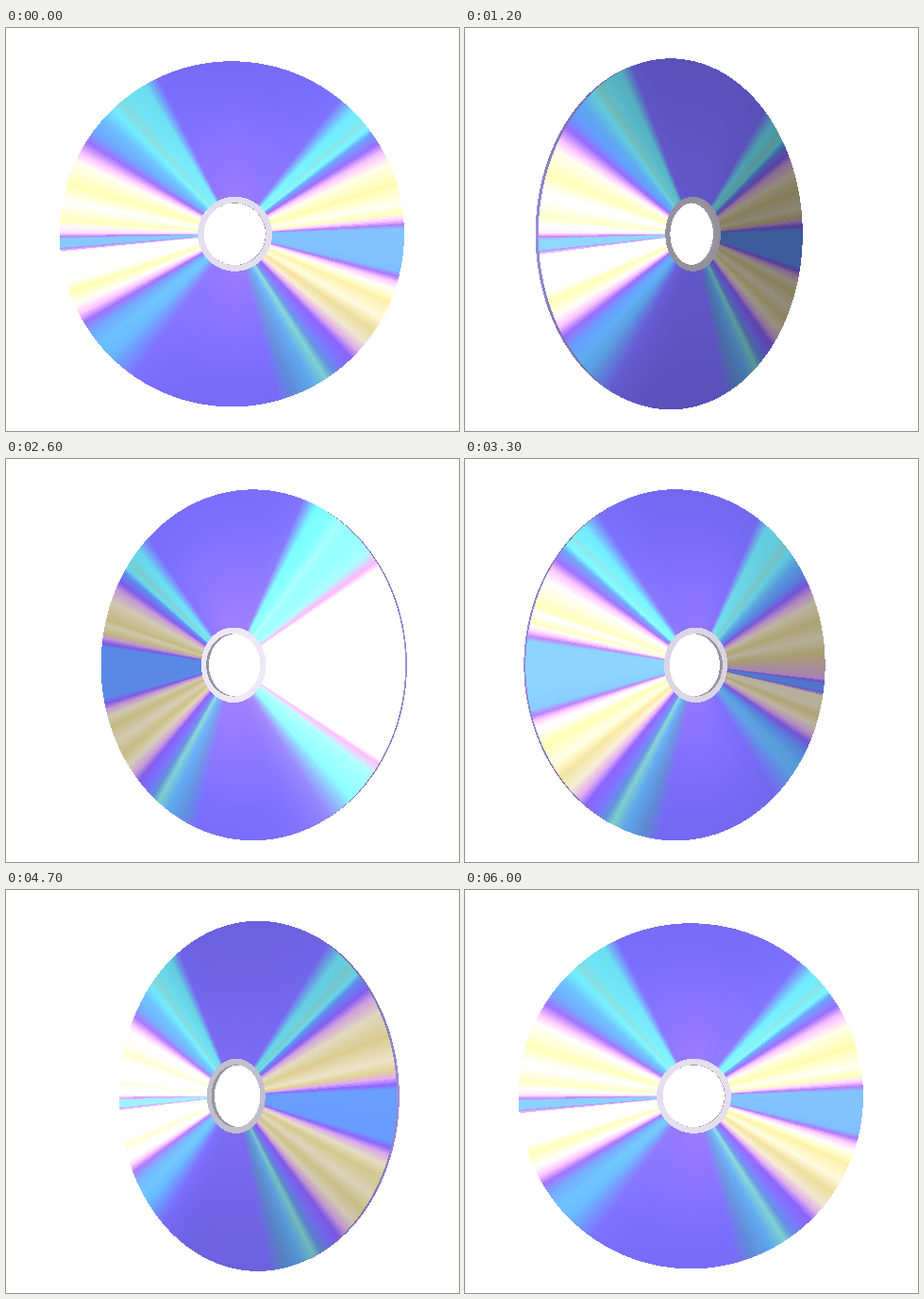
Write an HTML page with a canvas that moves like this. It is 480x427 px and loops after 6.1 s.

```html
<!DOCTYPE html>
<html lang="en">
<head>
<meta charset="utf-8">
<title>Spinning disc</title>
<style>
html, body { margin: 0; width: 100%; height: 100%; overflow: hidden; background: #fff; }
canvas { display: block; }
</style>
</head>
<body>
<canvas id="stage" width="480" height="427"></canvas>
<script>
const W = 480, H = 427, CX = 242.7, CY = 218.3;
const R = 183, HUB = 39.5, HOLE = 33, THICK = 5.2, DIST = 690;
const STEP = 100, LOOP = 6100, LAST = 60;

const ctx = document.getElementById('stage').getContext('2d');
const img = ctx.createImageData(W, H);
const px = img.data;

const inks = {
  P: [116, 104, 240], M: [124, 88, 226], K: [192, 148, 205],
  W: [203, 196, 174], Y: [192, 180, 127], B: [90, 135, 228],
  C: [100, 206, 224], S: [90, 160, 225], T: [92, 135, 208], G: [118, 195, 195]
};

const lerp = (a, b, f) => a + (b - a) * f;

// Colour wheel in half degrees; slit and blue vary between the two sides.
function wheel(slit, blue) {
  const spec = [
    [0, 'B'], [blue - 1.5, 'B'], [blue, 'M'], [blue + 2, 'K'], [blue + 4, 'Y'],
    [blue + 7, 'W'], [17, 'Y'], [24, 'W'], [29, 'K'], [32, 'M'], [36, 'B'],
    [38, 'C'], [41, 'G'], [43, 'C'], [46, 'C'], [52, 'P'], [116, 'P'],
    [121, 'C'], [127, 'C'], [131, 'G'], [134, 'C'], [139, 'S'], [144, 'B'],
    [148, 'M'], [152, 'K'], [156, 'W'], [163, 'Y'], [169, 'W'], [175, 'Y'],
    [slit - 3, 'K'], [slit - 2, 'M'], [slit - 1.2, 'B'], [slit + 1.5, 'B'],
    [slit + 2.2, 'M'], [slit + 3.5, 'W'], [196, 'W'], [199, 'Y'], [203, 'W'],
    [207, 'K'], [210, 'M'], [214, 'B'], [219, 'S'], [224, 'S'], [234, 'P'],
    [284, 'P'], [290, 'T'], [297, 'S'], [302, 'G'], [305, 'T'], [309, 'P'],
    [313, 'M'], [316, 'K'], [320, 'W'], [325, 'Y'], [330, 'W'], [336, 'Y'],
    [340, 'W'], [343, 'K'], [345, 'M'], [347, 'B'], [360, 'B']
  ];
  const out = [];
  for (let i = 0, s = 0; i < 720; i++) {
    const a = i / 2;
    while (a >= spec[s + 1][0]) s++;
    const [a0, k0] = spec[s], [a1, k1] = spec[s + 1];
    out.push(inks[k0].map((v, c) => lerp(v, inks[k1][c], (a - a0) / (a1 - a0))));
  }
  return out;
}
const front = wheel(182.5, 3), back = wheel(188, 8);

// Turn angle, then light on the left, middle and right.
const lights = [
  [4, 1.5, 1.07, 1.45], [43, 1.6, 0.8, 0.66], [95, 0.7, 0.7, 0.7],
  [149, 1, 1.1, 3], [211, 1.6, 1.05, 0.88], [280, 0.72, 0.72, 0.72],
  [345, 3, 1.14, 1.55], [365, 1.5, 1.07, 1.45]
];
function lightAt(deg) {
  let i = 0;
  while (i < lights.length - 2 && deg >= lights[i + 1][0]) i++;
  const a = lights[i], b = lights[i + 1], f = (deg - a[0]) / (b[0] - a[0]);
  return a.map((v, n) => v * (b[n] / v) ** f);
}

function turn(t) {
  return 4 + 360 * t * t * (3 - 2 * t) + 1.3 * Math.sin(Math.PI * t);
}

function draw(t) {
  const deg = turn(t), rad = deg * Math.PI / 180;
  const c = Math.cos(rad), s = Math.sin(rad);
  const side = c > 0 ? 1 : -1;
  const near = side > 0 ? 0 : -THICK, far = -THICK - near;
  const map = side > 0 ? front : back;
  const [, left, mid, right] = lightAt(deg);
  const hub = Math.pow(mid, 1.5), blush = 200 * Math.max(0, mid - 0.9);
  let u, v, r;

  // Screen point to disc plane at depth w
  function hit(x, y, w) {
    u = (x * (1 - w * c / DIST) - w * s) / (c - x * s / DIST);
    v = y * (1 + (u * s - w * c) / DIST);
    r = Math.hypot(u, v);
    return r <= R && r >= HOLE;
  }
  function put(i, red, green, blue) {
    px[i] = red; px[i + 1] = green; px[i + 2] = blue;
  }
  function face(i) {
    if (r < HUB) return put(i, 206 * hub, 200 * hub, 215 * hub);
    const a = Math.atan2(v, -u) * 180 / Math.PI + 180;
    const ink = map[Math.floor(a * 2) % 720];
    const cos2 = (u / r) ** 2, rr = r / R;
    const edge = u * side < 0 ? left : right;
    const g = lerp(mid * (1.06 - 0.1 * rr), edge, cos2 * cos2);
    const glow = blush * (1 - cos2) ** 2 * Math.max(0, 1 - 1.2 * rr);
    put(i, ink[0] * g + glow, ink[1] * g + glow * 0.3, ink[2] * g);
  }

  px.fill(255);
  for (let py = 24; py < 413; py++) {
    for (let qx = 50; qx < 438; qx++) {
      const x = qx + 0.5 - CX, y = py + 0.5 - CY, i = (py * W + qx) * 4;
      if (hit(x, y, near)) { face(i); continue; }
      const inside = r < HOLE;
      for (let n = 1; n < 7; n++) {
        if (!hit(x, y, lerp(near, far, n / 6))) continue;
        const k = 1 - 0.3 * Math.abs(y) / R;
        if (inside) put(i, 150, 150, 160);
        else put(i, 155 * k, 145 * k, 220 * k);
        break;
      }
    }
  }
  ctx.putImageData(img, 0, 0);
}

let shown = -1;
function tick() {
  const n = Math.floor(performance.now() % LOOP / STEP);
  if (n !== shown) draw((shown = n) / LAST);
  requestAnimationFrame(tick);
}
tick();
</script>
</body>
</html>
```
